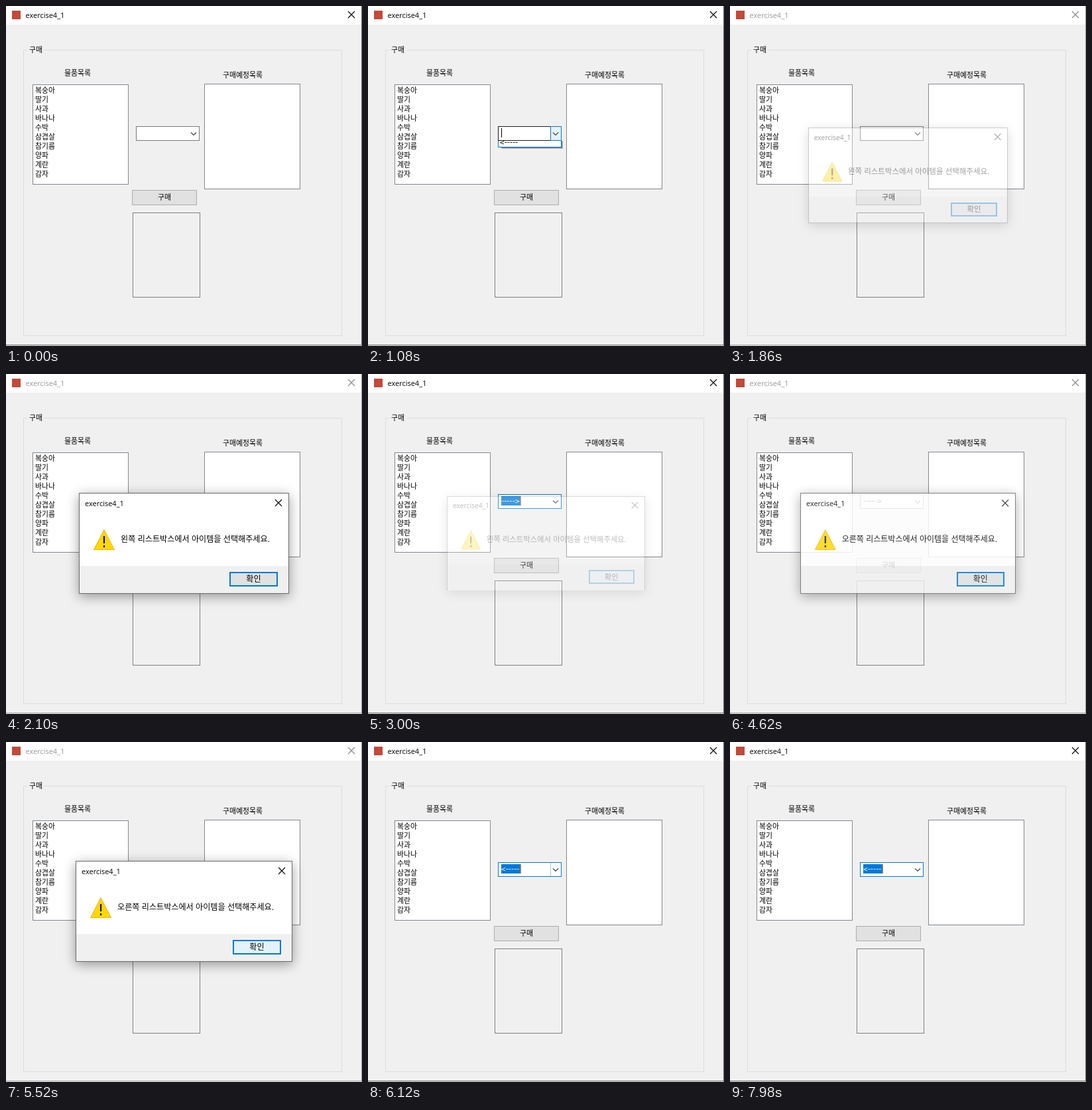
Animation, 537 px wide and 512 px high, one loop 8 s. Source, as an HTML page:

```html
<!DOCTYPE html>
<html lang="ko">
<head>
<meta charset="utf-8">
<style>
html, body { margin: 0; width: 537px; height: 512px; overflow: hidden; background: #f0f0f0; }
svg { display: block; }
rect { shape-rendering: crispEdges; }
text { font: 10.87px "Noto Sans CJK KR", "Noto Sans CJK", sans-serif; white-space: pre; }
.title { font: 11px "Open Sans", "Noto Sans", sans-serif; }
.arrow { font-size: 12px; }
.msg { font-size: 12.1px; }
.shadow { filter: drop-shadow(0 4px 9px rgba(0,0,0,.38)); }
</style>
</head>
<body>
<svg id="stage" width="537" height="512" viewBox="0 0 537 512"></svg>
<script>
const stage = document.getElementById('stage');
const BLUE = '#0078d7';

// Box with a one pixel border; right and bottom are exclusive.
const box = (l, t, r, b, fill, stroke, extra = '') =>
  `<rect x="${l + .5}" y="${t + .5}" width="${r - l - 1}" height="${b - t - 1}" fill="${fill}" stroke="${stroke}" ${extra}/>`;
const fillBox = (l, t, r, b, fill, extra = '') =>
  `<rect x="${l}" y="${t}" width="${r - l}" height="${b - t}" fill="${fill}" ${extra}/>`;
const label = (x, y, s, extra = '') =>
  `<text x="${x}" y="${y}" ${extra}>${s.replace('<', '&lt;')}</text>`;
const cross = (x, y, id = '') =>
  `<path id="${id}" d="M${x} ${y}l10 10m0 -10l-10 10" stroke="#000" stroke-width="1.1" fill="none"/>`;

const RIGHT = '----->', LEFT = '<-----';
const goods = ['복숭아', '딸기', '사과', '바나나', '수박', '삼겹살', '참기름', '양파', '계란', '감자'];

function dialog(id, l, r, msg) {
  return `<g id="${id}">
    ${box(l, 179, r, 331, '#fff', '#6a6a6a', 'class="shadow"')}
    ${fillBox(l + 1, 289, r - 1, 330, '#f0f0f0')}
    ${label(l + 9, 199, 'exercise4_1', 'class="title"')}
    ${cross(r - 21, 189)}
    <path d="M${l + 38} 234.5L${l + 53.5} 264.5H${l + 22.5}Z" fill="#ffd800" stroke="#f2b01e" stroke-linejoin="round"/>
    <path d="M${l + 38} 244v11m0 3v3" stroke="#111" stroke-width="2.2"/>
    ${label(l + 63, 253, msg, 'class="msg"')}
    ${fillBox(r - 90, 298, r - 17, 320, BLUE)}
    ${fillBox(r - 88, 300, r - 19, 318, '#e1e1e1')}
    ${fillBox(r - 88, 300, r - 19, 318, '#e5f1fb', `id="${id}Hover"`)}
    ${label(r - 53.5, 313, '확인', 'class="msg" text-anchor="middle"')}
  </g>`;
}

stage.innerHTML = `
  <clipPath id="dropClip"><rect x="190" y="203" width="110" height="40"/></clipPath>
  ${fillBox(0, 0, 537, 512, '#f0f0f0')}
  ${fillBox(0, 0, 536, 28, '#fff')}
  ${fillBox(536, 0, 537, 511, '#6e6e6e', 'id="edgeR"')}
  ${fillBox(0, 510, 537, 511, '#6e6e6e', 'id="edgeB"')}
  ${fillBox(0, 511, 537, 512, '#e2e2e2')}
  ${fillBox(9, 7, 22, 20, '#c24a3a')}
  ${label(29.5, 18, 'exercise4_1', 'class="title" id="title"')}
  ${cross(516, 8, 'close')}
  ${box(26, 66, 507, 497, 'none', '#dcdcdc')}
  ${fillBox(32, 60, 58, 72, '#f0f0f0')}
  ${label(35, 70, '구매')}
  ${label(88, 105, '물품목록')}
  ${label(327, 108, '구매예정목록')}
  ${box(40, 118, 185, 269, '#fff', '#828790')}
  ${goods.map((s, i) => label(44, 131 + 14 * i, s)).join('')}
  ${box(299, 117, 444, 276, '#fff', '#828790')}
  ${box(190, 277, 288, 300, '#e1e1e1', '#adadad')}
  ${label(239, 292, '구매', 'text-anchor="middle"')}
  ${box(191, 311, 293, 439, '#f0f0f0', '#7a7a7a')}
  ${box(192, 312, 292, 438, 'none', '#fafafa')}
  ${box(196, 181, 292, 203, '#fff', '#7a7a7a', 'id="combo"')}
  ${box(275, 181, 292, 203, '#e5f1fb', BLUE, 'id="drop"')}
  ${fillBox(275, 182, 276, 202, '#a9c4da', 'id="split"')}
  <path d="M279 190.5l4 4l4 -4" fill="none" stroke="#444" stroke-width="1.2"/>
  ${fillBox(201, 184, 230, 198, BLUE, 'id="mark"')}
  ${label(201, 196, '', 'class="arrow" id="value"')}
  ${fillBox(230, 184, 231, 198, '#ff8728', 'id="caret"')}
  ${fillBox(201, 184, 202, 198, '#000', 'id="bar"')}
  <g clip-path="url(#dropClip)"><g id="list">
    ${fillBox(202, 209, 294, 235, '#000', 'opacity=".25"')}
    ${fillBox(200, 207, 293, 234, '#000', 'opacity=".3"')}
    ${box(196, 203, 292, 233, '#fff', BLUE)}
    ${fillBox(197, 204, 291, 218, BLUE, 'id="row"')}
    ${label(199, 216, RIGHT, 'class="arrow" id="item0"')}
    ${label(199, 230, LEFT, 'class="arrow" id="item1"')}
  </g></g>
  ${dialog('dlg1', 110, 427, '왼쪽 리스트박스에서 아이템을 선택해주세요.')}
  ${dialog('dlg2', 105, 432, '오른쪽 리스트박스에서 아이템을 선택해주세요.')}`;

const el = {};
stage.querySelectorAll('[id]').forEach(n => el[n.id] = n);
const set = (id, name, value) => el[id].setAttribute(name, value);
const show = (id, on) => set(id, 'opacity', Number(on));
const ramp = (t, a, b) => Math.min(1, Math.max(0, (t - a) / (b - a)));
const within = (t, a, b) => t >= a && t < b;

function drawDialog(id, t, open, shut, hover) {
  const p = ramp(t, open, open + 300), q = ramp(t, shut, shut + 240);
  const scale = (1 - .1 * (1 - p) ** 3) * (1 - .08 * q);
  show(id, (1 - (1 - p) ** 2) * (1 - q));
  set(id, 'transform', `translate(268.5 255) scale(${scale}) translate(-268.5 -255)`);
  show(id + 'Hover', ramp(t, hover - 60, hover + 120));
}

function draw(t) {
  const modal = within(t, 1740, 2880) || within(t, 4440, 5580);
  set('title', 'fill', modal ? '#999' : '#000');
  set('close', 'stroke', modal ? '#888' : '#000');
  for (const id of ['edgeR', 'edgeB']) set(id, 'fill', modal ? '#a2a2a2' : '#6e6e6e');

  const opened = within(t, 1020, 1740) || within(t, 3480, 4440);
  const focused = !modal && t >= 2880;
  const hovered = within(t, 360, 1740) || within(t, 3480, 4440);
  set('combo', 'stroke', hovered ? '#1c1c1c' : focused ? BLUE : '#7a7a7a');
  const pressed = within(t, 3480, 4440);
  set('drop', 'fill', pressed ? '#cce4f7' : '#e5f1fb');
  show('drop', pressed ? 1 : within(t, 360, 1740) ? ramp(t, 540, 780) : 0);
  show('split', t >= 5760 ? 1 - ramp(t, 6840, 7980) : 0);

  el.value.textContent = t < 2880 ? '' : t < 5580 ? RIGHT : LEFT;
  set('value', 'fill', focused ? '#fff' : '#000');
  show('mark', focused);
  show('caret', focused && !within(t, 4260, 4440) && !within(t, 6660, 7440));
  show('bar', within(t, 1020, 1740));

  const slide = t < 1740 ? ramp(t, 1020, 1200) : ramp(t, 3540, 3780);
  show('list', opened && slide > 0);
  set('list', 'transform', `translate(0 ${Math.round(-30 * (1 - slide))})`);
  const row = within(t, 1380, 1740) || within(t, 3480, 4020) ? 0 : within(t, 4020, 4440) ? 1 : -1;
  show('row', row >= 0);
  set('row', 'y', 204 + 14 * Math.max(0, row));
  [0, 1].forEach(i => set('item' + i, 'fill', row === i ? '#fff' : '#000'));

  drawDialog('dlg1', t, 1800, 2820, 2340);
  drawDialog('dlg2', t, 4440, 5520, 5040);
}

const start = performance.now();
function tick() {
  const t = (performance.now() - start) % 8000;
  draw(Math.floor(t / 60) * 60);
  requestAnimationFrame(tick);
}
tick();
</script>
</body>
</html>
```
